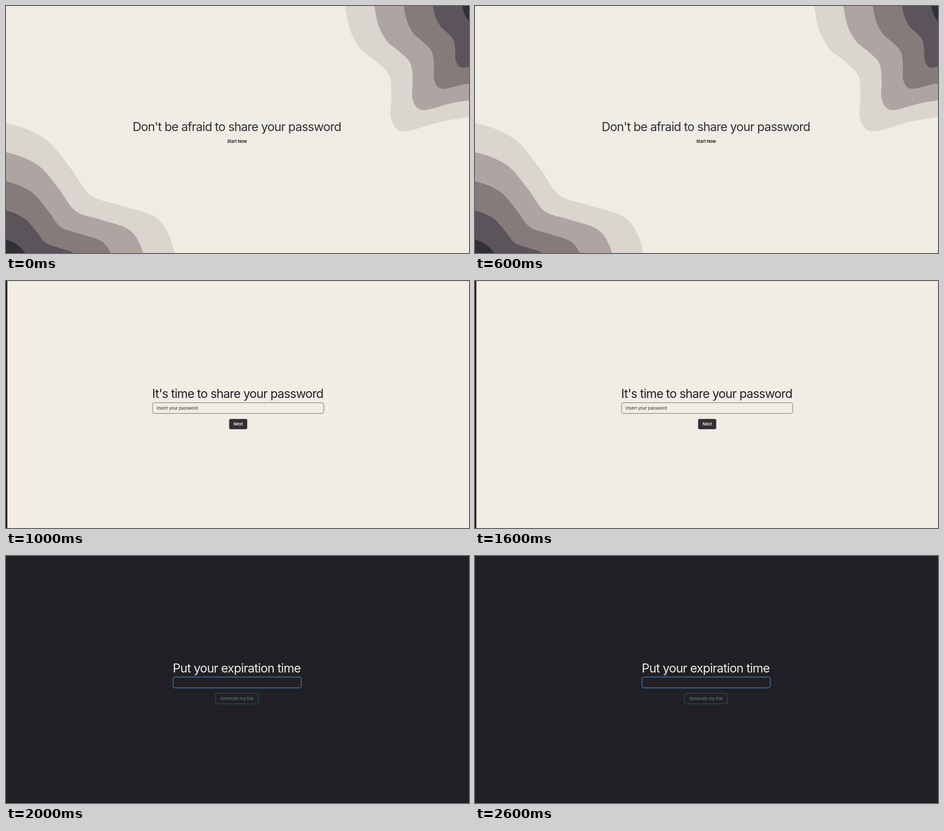
An HTML page for the animation above (3 s loop, 1024x547 px).

```html
<!DOCTYPE html>
<html lang="en">
<head>
<meta charset="utf-8">
<title>Share your password</title>
<style>
  html, body { margin: 0; width: 100%; height: 100%; overflow: hidden; background: #efece4; }
  svg { display: block; width: 100vw; height: 100vh; }
  .scene { opacity: 0; }
  text { font-family: Inter, "Noto Sans", sans-serif; font-optical-sizing: none; text-anchor: middle; }
  .title { font-size: 27px; letter-spacing: -.035em; }
  .loose { letter-spacing: -.03em; }
  .small { font-size: 9.3px; letter-spacing: -.01em; }
  .strong { font-weight: 600; }
</style>
</head>
<body>
<svg viewBox="0 0 1024 547" preserveAspectRatio="none">
  <defs>
    <filter id="soft" x="-5%" y="-300%" width="110%" height="700%">
      <feGaussianBlur stdDeviation="4"/>
    </filter>
    <rect id="shadow" x="218" y="547" width="594" height="6" fill="#4a403a" opacity=".22" filter="url(#soft)"/>
  </defs>

  <g class="scene">
    <rect width="1024" height="547" fill="#efece4"/>
    <g id="waves"></g>
    <use href="#shadow"/>
    <text class="title" x="510.5" y="277" fill="#323035">Don't be afraid to share your password</text>
    <text class="small strong" x="511" y="303" fill="#151417">Start Now</text>
  </g>

  <g class="scene">
    <rect width="1024" height="547" fill="#f1ece4"/>
    <rect width="1024" height="1" fill="#dcd8d1"/>
    <rect width="3" height="547" fill="#212026"/>
    <use href="#shadow"/>
    <text class="title" x="512.5" y="259" fill="#212026">It's time to share your password</text>
    <rect x="324" y="269.5" width="378.7" height="23.8" rx="4" fill="none" stroke="#65626a"/>
    <text class="small" x="379" y="285" fill="#323035">Insert your password</text>
    <rect x="493.5" y="305.5" width="40" height="22.7" rx="3" fill="#323035"/>
    <text class="small strong" x="513.5" y="320.2" fill="#efece4">Next</text>
  </g>

  <g class="scene">
    <rect width="1024" height="547" fill="#212026"/>
    <rect y="546" width="1024" height="1" fill="#151419"/>
    <text class="title loose" x="510.3" y="257.6" fill="#efece4">Put your expiration time</text>
    <rect x="369.5" y="268" width="283.5" height="24" rx="4" fill="none" stroke="#427fc2" stroke-width="1.4"/>
    <rect x="463.5" y="304" width="95" height="23.3" rx="3.5" fill="none" stroke="#2f6266"/>
    <text class="small strong" x="511" y="319" fill="#3d757a">Generate my link</text>
  </g>
</svg>
<script>
  const colors = ['#dad5ce', '#aea5a2', '#857b7b', '#5b545a', '#323035'];

  // Smooth curve through all points (Catmull-Rom as cubic Béziers).
  function spline(points) {
    const at = i => points[Math.max(0, Math.min(points.length - 1, i))];
    const handle = (i, sign) => at(i).map((v, axis) => v + sign * (at(i + 1)[axis] - at(i - 1)[axis]) / 6);
    return `M${at(0)}` + points.slice(1)
      .map((point, i) => `C${handle(i, 1)} ${handle(i + 1, -1)} ${point}`).join('');
  }

  // Each layer shrinks by a fifth towards a focus that drifts away from the corner along the edge.
  function addWaves(edge, corner, drift) {
    colors.forEach((fill, layer) => {
      const shrink = layer / colors.length;
      const points = edge.map((point, i) => {
        const along = i / (edge.length - 1);
        return point.map((v, axis) => v + (corner[axis] + drift[axis] * along - v) * shrink);
      });
      const path = document.createElementNS('http://www.w3.org/2000/svg', 'path');
      path.setAttribute('d', `${spline(points)}L${corner}Z`);
      path.setAttribute('fill', fill);
      document.getElementById('waves').append(path);
    });
  }

  addWaves([[0, 259], [50, 274.5], [97, 303], [144, 361], [187, 419], [253, 441.5],
    [329, 467], [362, 511], [380, 581]], [0, 581.5], [42, 26]);
  addWaves([[750, 0], [761, 53], [784, 95], [817.5, 122], [847, 153], [852.5, 199],
    [852, 250], [880, 277.5], [968, 255], [1074, 239]], [1073.5, 0], [25, 54]);

  const scenes = [...document.querySelectorAll('.scene')];
  scenes.forEach((scene, i) => {
    const steps = scenes.map((_, j) => ({
      offset: j / scenes.length, opacity: i === j ? 1 : 0, easing: 'step-end'
    }));
    steps.push({ offset: 1, opacity: steps[0].opacity });
    scene.animate(steps, { duration: 3000, iterations: Infinity });
  });
</script>
</body>
</html>
```
